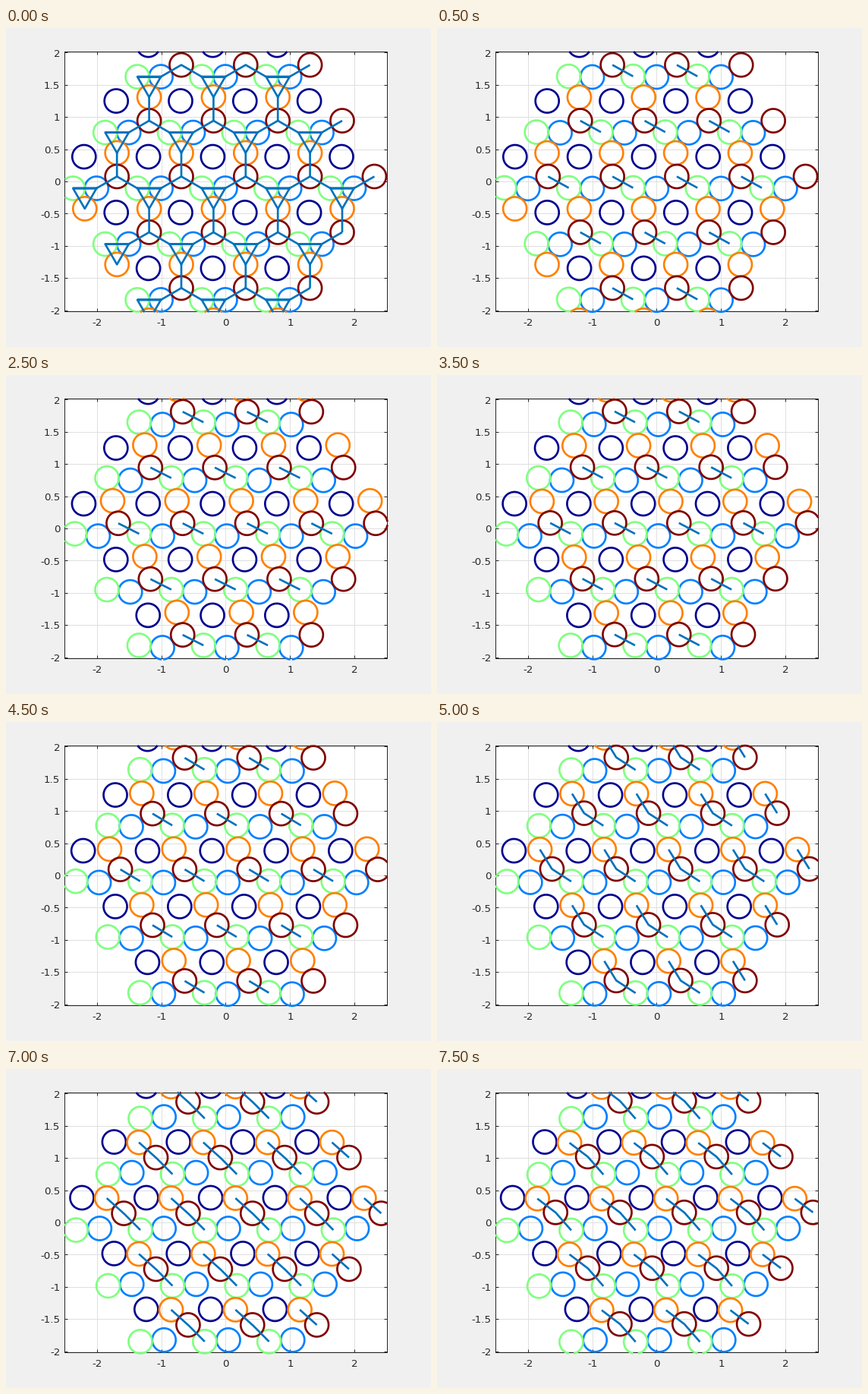
Recreate the animation shown at these times as a matplotlib script. Size 560 px wide and 420 px high, loop 8 s.

```python
import numpy as np
import matplotlib.pyplot as plt
from matplotlib.animation import FuncAnimation

W, H, DPI = 560, 420, 100
PX = 72 / DPI                      # one pixel in points
UNIT = 84.8                        # pixels per data unit
CX, CY = 289.8, 202.4              # pixel position of the data origin
LEFT, RIGHT, TOP, BOTTOM = 77.5, 502.5, 31.5, 373.5
TICK = 4
FRAMES, STEP = 16, 500
INK, GRID = "#262626", "#dfdfdf"

A1 = np.array([UNIT, 0.0])
A2 = np.array([UNIT / 2, -UNIT * np.sqrt(3) / 2])
CELLS = [(i, j) for j in range(-2, 3) for i in range(-2, 3) if abs(i + j) <= 2]

# Touching disks on a star lattice: triangles joined by one more disk
D = UNIT / (1 + np.sqrt(3))
COS30 = np.sqrt(3) / 2
RED = np.array([315.8, 195.5])
SKY = RED + [-D * COS30, D / 2]
GREEN = SKY - [D, 0]
ORANGE = SKY + [-D / 2, D * COS30]
NAVY = np.array([272.4, 169.5])

COLORS = {"navy": "#00008f", "sky": "#0080ff", "green": "#80ff80",
          "orange": "#ff8000", "red": "#800000"}
WRAP = 5                           # orange re-enters one cell higher
TOUCH = 10                         # orange and red touch again

# Contact chains: (disk, cell shift)
HERE, EAST, UP = (0, 0), (1, 0), (0, 1)
RING = [(d, HERE) for d in ("green", "sky", "orange", "green", "sky")]
LOCKED = [RING,
          [("sky", HERE), ("red", HERE), ("green", EAST)],
          [("orange", UP), ("red", HERE)]]
LOOSE = [[("red", HERE), ("green", EAST)]]
HINGED = [[("orange", HERE), ("red", HERE), ("green", EAST)]]

GAP = np.full((1, 2), np.nan)
ANGLE = np.linspace(0, 2 * np.pi, 181)
RIM = D / 2 * np.column_stack([np.cos(ANGLE), np.sin(ANGLE)])
T = np.linspace(0, 1, 80)[:, None]


def shift(cell):
    return cell[0] * A1 + cell[1] * A2


def centers(n):
    s = n / (FRAMES - 1)

    def swing(size, turns):
        return size * np.sin(turns * np.pi * s)

    pos = {
        "navy": NAVY + [-3.2 * s**2, 0],
        "sky": SKY + [swing(4.1, 0.5), swing(1.1, 1.5)],
        "green": GREEN + [swing(4, 0.6), swing(-2, 1.25)],
        "orange": ORANGE + [swing(-15.5, 0.36), 6.2 * s**1.5],
        "red": RED + [10 * s**1.6, -6.7 * s**3],
    }
    if n >= WRAP:
        pos["orange"] = pos["orange"] + A2
    return pos


def clipped(parts):
    """Join polylines and blank every vertex outside the axes box."""
    pts = np.vstack([p for part in parts for p in (part, GAP)])
    x, y = pts.T
    inside = (x >= LEFT) & (x <= RIGHT) & (y >= TOP - 1) & (y <= BOTTOM + 1)
    return np.where(inside, x, np.nan), np.where(inside, y, np.nan)


def chain_points(chain, cell, pos):
    knots = []
    for disk, (di, dj) in chain:
        c = (cell[0] + di, cell[1] + dj)
        knots.append(pos[disk] + shift(c) if c in CELLS else GAP[0])
    return np.vstack([p + (q - p) * T for p, q in zip(knots, knots[1:])])


def contacts(n):
    if n == 0:
        return LOCKED
    return HINGED if n >= TOUCH else LOOSE


fig = plt.figure(figsize=(W / DPI, H / DPI), dpi=DPI, facecolor="#f0f0f0")
ax = fig.add_axes([0, 0, 1, 1])
ax.set_xlim(0, W)
ax.set_ylim(H, 0)
ax.axis("off")


def rule(x, y, color=INK, z=2):
    # whole pixels, so snapping centres the line on that pixel
    ax.plot(np.floor(x), np.floor(y), color=color, lw=PX, zorder=z,
            solid_capstyle="butt")


def label(x, y, value, ha):
    ax.text(x, y, f"{value:g}", ha=ha, va="baseline", color=INK,
            family="DejaVu Sans", size=13.33 * PX)


ax.fill([LEFT, RIGHT, RIGHT, LEFT], [TOP, TOP, BOTTOM, BOTTOM],
        color="white", lw=0, zorder=0)
for v in range(-2, 3):
    x = CX + UNIT * v
    rule([x, x], [TOP, BOTTOM], GRID, 1)
    rule([x, x], [BOTTOM, BOTTOM - TICK])
    rule([x, x], [TOP, TOP + TICK])
    label(x, 392, v, "center")
for v in np.arange(-2, 2.1, 0.5):
    y = CY - UNIT * v
    rule([LEFT, RIGHT], [y, y], GRID, 1)
    rule([LEFT, LEFT + TICK], [y, y])
    rule([RIGHT, RIGHT - TICK], [y, y])
    label(71.3, y + 4.7, v, "right")
rule([LEFT, RIGHT, RIGHT, LEFT, LEFT], [TOP, TOP, BOTTOM, BOTTOM, TOP])

style = dict(lw=2.67 * PX, solid_capstyle="butt", solid_joinstyle="round")
rings = {k: ax.plot([], [], color=c, zorder=3, **style)[0]
         for k, c in COLORS.items()}
bonds, = ax.plot([], [], color="#0072bd", zorder=4, **style)


def draw(n):
    pos = centers(n)
    for k, line in rings.items():
        line.set_data(*clipped([pos[k] + shift(c) + RIM for c in CELLS]))
    bonds.set_data(*clipped([chain_points(chain, c, pos)
                             for chain in contacts(n) for c in CELLS]))
    return [*rings.values(), bonds]


anim = FuncAnimation(fig, draw, frames=FRAMES, interval=STEP,
                     repeat=True, repeat_delay=0)
plt.show()
```
